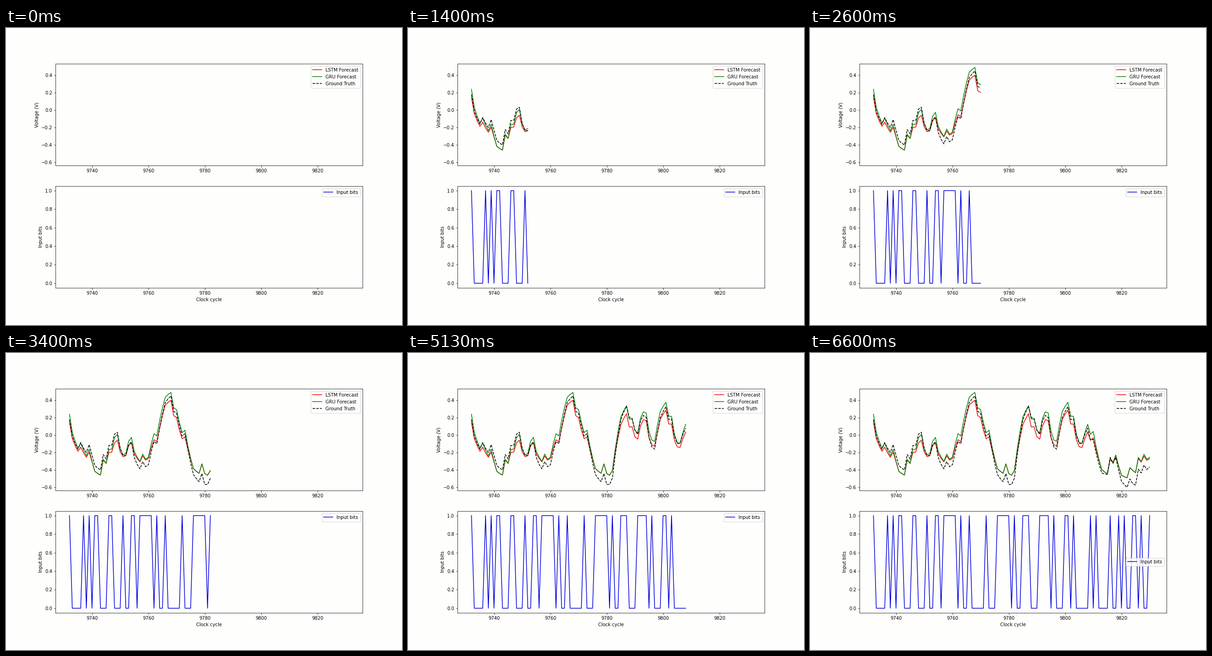
Recreate the animation shown at these times as a matplotlib script. Size 864 by 648 pixels, loop 6.67 s.

```python
import numpy as np
import matplotlib.pyplot as plt
from matplotlib.animation import FuncAnimation

FRAMES, INTERVAL = 230, 29  # one 6670 ms loop
SAMPLE_MS = 6670 / 100      # a new sample appears this often
START = 9732
WARM_UP = 12                # bits sent before the plot begins
PAPER = "#fefefd"

plt.rcParams.update({
    "font.family": "DejaVu Sans",
    "font.size": 10,
    "figure.facecolor": PAPER,
    "axes.facecolor": PAPER,
})

# Bit stream as alternating run lengths of ones and zeros
runs = [6, 3, 1, 2, 1, 4, 1, 1, 1, 1, 2, 3, 2, 3, 1, 2, 2, 1, 5, 1,
        1, 2, 1, 5, 1, 3, 5, 1, 1, 2, 3, 3, 4, 1, 1, 3, 2, 1, 1, 5,
        1, 1, 1, 4, 1, 2, 1, 1, 1, 2, 2, 1, 1, 2, 1]
stream = np.repeat(np.arange(len(runs)) % 2 == 0, runs).astype(float)
bits = stream[WARM_UP:]
n = np.arange(len(bits))
cycle = START + n

# The channel answers each bit after a delay, then decays exponentially
pulse = np.concatenate([np.zeros(5), [0.07, 0.13], 0.307 * 0.83 ** np.arange(40)])
gru = np.convolve(stream, pulse)[WARM_UP:len(stream)] - 0.975

# The LSTM undershoots more as the voltage rises
lstm = gru - 0.09 * np.clip((gru + 0.33) / 0.45, 0, 1)

# The true voltage drifts slowly around the GRU forecast
drift_at = [0, 8, 16, 24, 31, 36, 42, 48, 56, 65, 74, 78, 84, 92, 98]
drift = [-.06, .07, .04, -.085, -.09, -.04, -.04, -.125, .02, -.09,
         0, -.09, .01, -.15, -.11]
truth = gru + np.interp(n, drift_at, drift)

fig, (volt_ax, bit_ax) = plt.subplots(2, 1, figsize=(12, 9), dpi=72)
fig.subplots_adjust(left=0.125, right=0.9, bottom=0.125, top=0.88, hspace=0.2)

for ax in (volt_ax, bit_ax):
    ax.set_xlim(9727.05, 9835.95)
volt_ax.set_ylim(-0.637, 0.534)
bit_ax.set_ylim(-0.05, 1.05)
volt_ax.set_ylabel("Voltage (V)")
bit_ax.set_ylabel("Input bits")
bit_ax.set_xlabel("Clock cycle")


def trace(ax, values, color, label, style="-"):
    line, = ax.plot([], [], style, color=color, lw=1.5, label=label)
    return line, values


traces = [
    trace(volt_ax, lstm, "#f50000", "LSTM Forecast"),
    trace(volt_ax, gru, "green", "GRU Forecast"),
    trace(volt_ax, truth, "black", "Ground Truth", "--"),
    trace(bit_ax, bits, "#0000e0", "Input bits"),
]
volt_ax.legend(loc="upper right")
bit_ax.legend(loc="best")  # steps aside once the line reaches its corner


def update(frame):
    count = round(frame * INTERVAL / SAMPLE_MS)
    for line, values in traces:
        line.set_data(cycle[:count], values[:count])
    return [line for line, _ in traces]


anim = FuncAnimation(fig, update, frames=FRAMES, interval=INTERVAL,
                     repeat=True, repeat_delay=0, blit=False)
plt.show()
```
